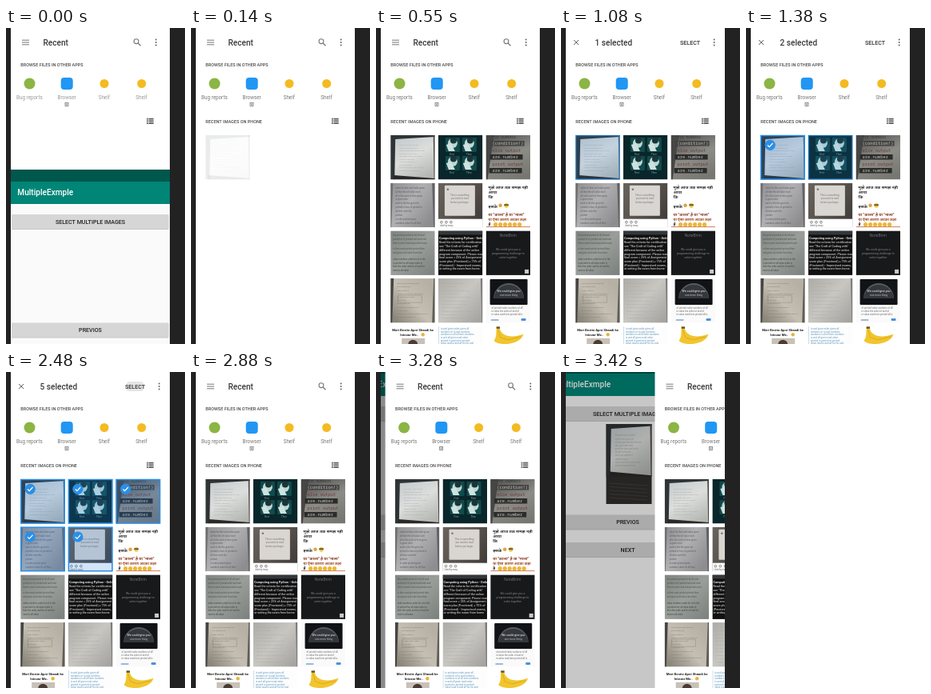
Animation, 224 px wide and 395 px high, one loop 3480 ms. Source, as an HTML page with a canvas:

```html
<!DOCTYPE html>
<html lang="en">
<head>
<meta charset="utf-8">
<title>Image picker</title>
<style>
html, body { margin: 0; width: 100%; height: 100%; overflow: hidden; background: #222; }
canvas { display: block; width: 224px; height: 395px; }
</style>
</head>
<body>
<canvas id="stage"></canvas>
<script>
const W = 224, H = 395, LOOP = 3480;
const LEFT = 6, PHONE = 199;
const TILE = 55.5, PITCH = 59.7;
const BLUE = '#2b8fe6';
const cv = document.getElementById('stage');
const g = cv.getContext('2d');
const dpr = window.devicePixelRatio || 1;
cv.width = W * dpr;
cv.height = H * dpr;

const clamp = v => Math.max(0, Math.min(1, v));
const ramp = (t, a, b) => clamp((t - a) / (b - a));

// Bursts of motion: start, end, number of steps
const BURSTS = [[70, 550, 8], [1010, 1520, 9], [1590, 2080, 8], [2410, 2880, 8], [3210, 3420, 4]];
const PICKS = [1070, 1320, 1595, 1730, 1865];
const CLEAR = 2610;

function stepped(t) {
  let s = 0;
  for (const [a, b, n] of BURSTS) {
    if (t < a) break;
    const d = (b - a) / (n - 1);
    s = a + Math.min(n - 1, Math.floor((t - a) / d + 0.01)) * d;
  }
  return s;
}

function rng(seed) {
  return () => (seed = (seed * 16807) % 2147483647) / 2147483647;
}

function box(x, y, w, h, c) {
  g.fillStyle = c;
  g.fillRect(x, y, w, h);
}

function round(x, y, w, h, r, c) {
  g.fillStyle = c;
  g.beginPath();
  g.roundRect(x, y, w, h, r);
  g.fill();
}

function dot(x, y, r, c) {
  g.fillStyle = c;
  g.beginPath();
  g.arc(x, y, r, 0, 7);
  g.fill();
}

function path(pts, c, w) {
  g.strokeStyle = c;
  g.lineWidth = w;
  g.beginPath();
  pts.forEach(([x, y], i) => i ? g.lineTo(x, y) : g.moveTo(x, y));
  g.stroke();
}

function text(s, x, y, size, c, weight = 400, align = 'left', family = 'Roboto, "Noto Sans Devanagari", "Noto Sans", sans-serif') {
  g.font = `${weight} ${size}px ${family}`;
  g.textAlign = align;
  g.fillStyle = c;
  g.fillText(s, x, y);
}

function fade(x0, y0, x1, y1, ...colors) {
  const f = g.createLinearGradient(x0, y0, x1, y1);
  colors.forEach((c, i) => f.addColorStop(i / (colors.length - 1), c));
  box(0, 0, TILE, TILE, f);
}

function poly(c, ...pts) {
  g.fillStyle = c;
  g.beginPath();
  pts.forEach(([x, y]) => g.lineTo(x, y));
  g.fill();
}

// Rows of small filler copy
const WORDS = 'the value of each item is read and then printed in order for all given numbers'.split(' ');
function copy(x, y, rows, gap, width, size, c, seed, least = 0.45) {
  const r = rng(seed * 7919);
  for (let i = 0; i < rows; i++) {
    const room = width * (least + (1 - least) * r());
    let s = '';
    g.font = `${size}px Roboto, sans-serif`;
    for (;;) {
      const next = s + WORDS[Math.floor(r() * WORDS.length)] + ' ';
      if (g.measureText(next).width > room) break;
      s = next;
    }
    text(s, x, y + i * gap, size, c);
  }
}

function postIcons(x, y) {
  [0, 6, 12].forEach(d => {
    g.strokeStyle = '#555';
    g.lineWidth = 0.7;
    g.beginPath();
    g.arc(x + d, y, 1.4, 0, 7);
    g.stroke();
  });
}

function screenPhoto() {
  fade(10, 0, 40, 55, '#c3c9cb', '#dcdedc', '#b5b7b3');
  poly('#2f3436', [0, 0], [55.5, 0], [55.5, 2], [6, 5], [5, 55.5], [0, 55.5]);
  poly('#2b2928', [4, 50], [55.5, 54], [55.5, 55.5], [4, 55.5]);
  poly('#4a4745', [53.5, 0], [55.5, 0], [55.5, 55.5], [54.5, 55.5]);
  copy(11, 13, 10, 3.5, 36, 2.2, '#a0a6a6', 7);
}

const TILES = [
  screenPhoto,
  () => {
    box(0, 0, TILE, TILE, '#09262a');
    for (let i = 0; i < 4; i++) {
      const x = 9 + (i % 2) * 21, y = 3 + (i >> 1) * 23;
      round(x, y, 18, 18, 1, '#124a4c');
      dot(x + 9, y + 7, 6, '#bcd8d4');
      dot(x + 10, y + 3.5, 4, '#1a3538');
      poly('#cfe2df', [x + 1, y + 9], [x + 7, y + 7], [x + 12, y + 17], [x + 4, y + 17]);
      text(i % 2 ? 'Then' : 'First', x + 5, y + 21.5, 3, '#8aa9a9');
    }
  },
  () => {
    fade(15, 0, 40, 55, '#565856', '#8c8c87', '#777771');
    poly('#454645', [0, 0], [10, 0], [2, 55.5], [0, 55.5]);
    const mono = '"Noto Sans Mono", monospace';
    const row = (s, y, c) => text(s, 8, y, 5.4, c, 500, 'left', mono);
    text('for numbers', 8, 4, 4.5, '#393a39', 400, 'left', mono);
    box(6, 7, 42, 6.5, '#444341');
    row('(condition!)', 12, '#c4c4c0');
    row('else output', 20.5, '#703a33');
    box(5, 24, 41, 6.5, '#2b2b2a');
    row('are.number', 29, '#c4c4c0');
    row('print output', 37.5, '#703a33');
    box(4, 41, 41, 6.5, '#2b2b2a');
    row('are.number', 46, '#c4c4c0');
  },
  () => {
    fade(0, 0, 55, 40, '#8f8f92', '#b0b0b3', '#8d8d90');
    poly('#626264', [52, 0], [55.5, 0], [55.5, 55.5], [54, 55.5]);
    poly('#6f6f70', [0, 0], [3, 0], [1, 55.5], [0, 55.5]);
    copy(6, 7, 10, 4.9, 42, 2.8, '#5c5c62', 31, 0.3);
  },
  () => {
    fade(0, 0, 55, 40, '#69635e', '#5a544f', '#433e3b');
    round(8, 3, 38, 38, 1, '#d9d5d1');
    text('This is something', 27, 16, 3, '#777', 400, 'center');
    text('you need to read', 27, 20.5, 3, '#777', 400, 'center');
    text('before you begin.', 27, 25, 3, '#777', 400, 'center');
    dot(12, 8, 1.3, '#777');
    box(0, 45, TILE, 11, '#fff');
    postIcons(4, 49);
    text('Liked by many', 2, 54, 2.6, '#555');
  },
  () => {
    box(0, 0, TILE, TILE, '#fff');
    text('मुझे आज तक समझ नही', 3, 7, 5.2, '#333', 700);
    text('आया', 3, 13.5, 5.2, '#333', 700);
    text('कि', 3, 19.5, 5.2, '#333', 700);
    text('इसके', 3, 31, 5.4, '#333', 700);
    dot(18, 28, 2.3, '#dfa43c');
    dot(25.5, 28, 2.8, '#efc23e');
    box(22.7, 26.8, 5.5, 1.3, '#333');
    text('या "काला" है या "नाला"', 3, 41, 5.1, '#8b3f28', 700);
    text('या ऐसा कारण अटका कहा', 3, 47.5, 4.7, '#a34b2b', 700);
    text('है', 3, 53.5, 5, '#333', 700);
    [12, 18, 24, 30, 36, 42].forEach(x => dot(x, 52, 2.6, '#edb73a'));
    box(0, 54.5, TILE, 1, '#cd6b36');
  },
  () => {
    fade(0, 0, 55, 55, '#7e8481', '#9a9e9a', '#7a807d');
    copy(3, 7, 3, 5, 50, 2.8, '#4d5350', 51, 0.8);
    copy(3, 24, 2, 5, 50, 2.8, '#4d5350', 87, 0.7);
    copy(3, 37, 4, 4.4, 48, 2.8, '#3f4542', 14, 0.4);
  },
  () => {
    box(0, 0, TILE, TILE, '#111112');
    box(0, 0, TILE, 5, '#34383a');
    text('Computing using Python - Online...', 1, 10.5, 3.9, '#e6e6e6', 700);
    ['Read the criteria for certification', 'see "The Craft of Coding with"', 'different because of the online', 'program component. Please read',
      'final score = 25% of Assignment', 'score plus (Proctored) + 75% of', '(Proctored) - Improvised exams,', 'or writing the exam from home']
      .forEach((s, i) => text(s, 1, 16 + i * 4.7, 3.7, '#c8c8c8', 500));
  },
  () => {
    box(0, 0, TILE, TILE, '#18191b');
    text('NoteBrim', 27.7, 7.5, 5, '#6d7074', 400, 'center');
    text('We could give you a', 27.7, 25, 3.5, '#85878a', 400, 'center');
    text('programming challenge to', 27.7, 30, 3.5, '#85878a', 400, 'center');
    text('solve together', 27.7, 35, 3.5, '#85878a', 400, 'center');
    box(48.5, 48.5, 5, 5, '#c9cbcd');
  },
  () => {
    fade(0, 45, 45, 5, '#8b867a', '#c4bfb2', '#b5b0a3');
    poly('#454544', [0, 0], [4, 0], [2, 55.5], [0, 55.5]);
    poly('#5f5d57', [54, 0], [55.5, 0], [55.5, 55.5], [52, 55.5]);
    copy(8, 7, 11, 4.2, 40, 2.5, '#7d786d', 93, 0.3);
    g.strokeStyle = '#8b877b';
    g.lineWidth = 0.5;
    g.strokeRect(9, 21, 30, 9);
  },
  () => {
    fade(0, 0, 55, 50, '#adaba6', '#c8c6c1', '#a5a39f');
    copy(4, 7, 11, 4.3, 42, 2.5, '#aaa7a2', 41);
    poly('#7d7b78', [53, 0], [55.5, 0], [55.5, 55.5], [54.5, 55.5]);
  },
  () => {
    box(0, 0, TILE, TILE, '#fafafa');
    round(5, 1, 47, 32, 1, '#111316');
    g.save();
    g.beginPath();
    g.rect(5, 1, 47, 24);
    g.clip();
    dot(28.5, 25, 19, '#565b60');
    dot(28.5, 27, 19, '#34383d');
    g.restore();
    text('We could give you', 28.5, 17, 3.6, '#d9d9d9', 500, 'center');
    text('one more thing', 28.5, 21.5, 3.3, '#c4c4c4', 400, 'center');
    copy(7, 38, 3, 3.8, 43, 2.9, '#666', 62, 0.8);
    round(6, 51, 10, 2, 1, '#9db9dc');
    round(44, 50, 6, 3, 1, '#4d91d8');
  },
  () => {
    box(0, 0, TILE, TILE, '#fff');
    text('Meri Bestie Apni Shaadi ke', 2, 6, 4.3, '#222', 700);
    text('Intezar Me..', 12, 12, 4.3, '#222', 700);
    dot(40.5, 10.5, 2.2, '#e7b43d');
    box(14, 15, 29, 41, '#c8c1b7');
    dot(28, 23, 6, '#4b3b35');
    round(18, 29, 21, 27, 7, '#4b3b35');
  },
  () => {
    box(0, 0, TILE, TILE, '#fdfdfd');
    copy(3, 4, 6, 3.7, 49, 3, '#5c96bd', 18, 0.8);
    box(0, 0, 1, TILE, '#c6dce8');
  },
  () => {
    box(0, 0, TILE, TILE, '#fff');
    g.fillStyle = '#f2c52d';
    g.beginPath();
    g.moveTo(17, 2);
    g.bezierCurveTo(19, 13, 32, 15, 47, 10);
    g.bezierCurveTo(43, 24, 15, 25, 10, 18);
    g.bezierCurveTo(14, 13, 12, 8, 13.5, 2);
    g.fill();
    path([[15, 4], [18, 14], [27, 17], [44, 13]], '#d6a51f', 0.8);
    box(13, 0.5, 4.5, 2.5, '#6b5421');
  }
];

function tile(i, t) {
  const x = 12.2 + (i % 3) * PITCH, y = 134 + Math.floor(i / 3) * PITCH;
  const late = 130 + i * 12;
  const a = ramp(t, late, late + 110);
  if (!a) return;
  g.save();
  g.translate(x, y);
  g.globalAlpha = a;
  g.save();
  g.beginPath();
  g.rect(0, 0, TILE, TILE);
  g.clip();
  TILES[i]();
  g.restore();
  const at = PICKS[i];
  if (at && t >= at && t < CLEAR + 130) {
    const out = 1 - ramp(t, CLEAR, CLEAR + 130);
    g.globalAlpha = out * (0.6 + 0.4 * ramp(t, at, at + 60));
    box(0, 0, TILE, TILE, 'rgba(35,125,225,.2)');
    g.strokeStyle = BLUE;
    g.lineWidth = 1.5;
    g.strokeRect(0.5, 0.5, TILE - 1, TILE - 1);
    g.globalAlpha = out * ramp(t, at + 80, at + 140);
    dot(12, 12.3, 6.6, BLUE);
    path([[8.8, 12.5], [11, 14.7], [15.3, 10]], '#fff', 1.2);
  }
  g.restore();
}

function toolbar(t) {
  const count = t < CLEAR ? PICKS.filter(p => t >= p).length : 0;
  const dots = count ? 185.7 : 181.7;
  if (count) {
    path([[10.2, 15], [16.2, 21]], '#555', 1);
    path([[16.2, 15], [10.2, 21]], '#555', 1);
    text(count + ' selected', 36.5, 21.8, 10.1, '#3a3a3a', 500);
    const press = ramp(t, 2350, 2560);
    if (t >= 2410) round(155.5 - 18 * press, 18 - 10 * press, 36 * press, 20 * press, 4, 'rgba(0,0,0,.1)');
    text('SELECT', 143, 20.8, 7.1, '#333', 500);
  } else {
    [15.2, 18, 20.8].forEach(y => path([[14, y], [23, y]], '#777', 1));
    text('Recent', 40.5, 21.8, 10.1, '#3a3a3a', 500);
    g.strokeStyle = '#777';
    g.lineWidth = 1.1;
    g.beginPath();
    g.arc(157, 16.7, 2.9, 0, 7);
    g.stroke();
    path([[159.2, 19], [162.5, 22.2]], '#777', 1.2);
  }
  [14.4, 18, 21.6].forEach(y => dot(dots, y, 1, '#666'));
}

function picker(t) {
  box(0, 0, PHONE, H, '#fff');
  toolbar(t);
  text('BROWSE FILES IN OTHER APPS', 12.3, 48.4, 5.5, '#4a4a4a', 500);
  dot(23.5, 69.5, 7, '#8bb544');
  round(62.7, 62, 15, 15, 4, '#2196f3');
  [117, 163.7].forEach(x => dot(x, 69.5, 5.5, '#f4bb20'));
  const grey = t < 70 ? '#999' : '#777';
  ['Bug reports', 'Browser', 'Shelf', 'Shelf'].forEach((s, i) => text(s, 23.4 + i * 46.7, 89.4, 6.3, grey, 400, 'center'));
  g.strokeStyle = '#777';
  g.lineWidth = 0.8;
  g.strokeRect(68, 93.5, 4, 4);
  dot(70, 95.5, 0.9, '#777');
  [113.6, 116.3, 119].forEach(y => {
    box(170, y - 0.9, 1.8, 1.9, '#666');
    box(172.5, y - 0.9, 6.2, 1.9, '#666');
  });
  if (t >= 130) text('RECENT IMAGES ON PHONE', 12.3, 118.6, 5.5, '#4a4a4a', 500);
  for (let i = 0; i < TILES.length; i++) tile(i, t);
}

function button(label, y) {
  round(1, y + 0.7, 196.5, 18.2, 1, 'rgba(0,0,0,.2)');
  round(1, y, 196.5, 18, 1, '#d6d6d6');
  text(label, 99.5, y + 11.6, 7.1, '#222', 500, 'center');
}

function app(filled) {
  box(0, -13, PHONE, H + 13, '#fafafa');
  box(0, -13, PHONE, 15, '#00574b');
  box(0, 2, PHONE, 28, '#008577');
  text('MultipleExmple', 8.3, 19.3, 10.1, '#fff', 500);
  button('SELECT MULTIPLE IMAGES', 43);
  button('PREVIOS', 178.5);
  button('NEXT', 213);
  if (filled) {
    g.save();
    g.translate(72.5, 65);
    box(0, 0, 57, 100, '#302e2d');
    g.scale(57 / TILE, 66 / TILE);
    screenPhoto();
    g.restore();
    for (let y = 0; y < 5; y++) path([[77, 139 + y * 4.5], [124, 142 + y * 4.5]], '#43403e', 1);
  }
}

function draw(now) {
  const t = stepped(now % LOOP);
  g.setTransform(dpr, 0, 0, dpr, 0, 0);
  box(0, 0, W, H, '#222');
  g.save();
  g.beginPath();
  g.rect(LEFT, 0, PHONE, H);
  g.clip();
  g.translate(LEFT, 0);
  if (t < 3210) {
    picker(t);
    if (t < 200) {
      g.translate(0, 190 + 115 * t / 70);
      app(false);
    }
  } else {
    const x = 0.5 + 111 * Math.pow((t - 3210) / 210, 2.8);
    g.save();
    g.translate(-50 * (1 - x / PHONE), 0);
    app(true);
    g.restore();
    // The window behind brightens as the picker leaves
    box(0, 0, PHONE, H, `rgba(0,0,0,${0.46 * (1 - x / PHONE)})`);
    g.translate(x, 0);
    picker(t);
  }
  g.restore();
}

const start = performance.now();
function tick() {
  draw(performance.now() - start);
  requestAnimationFrame(tick);
}
tick();
</script>
</body>
</html>
```
